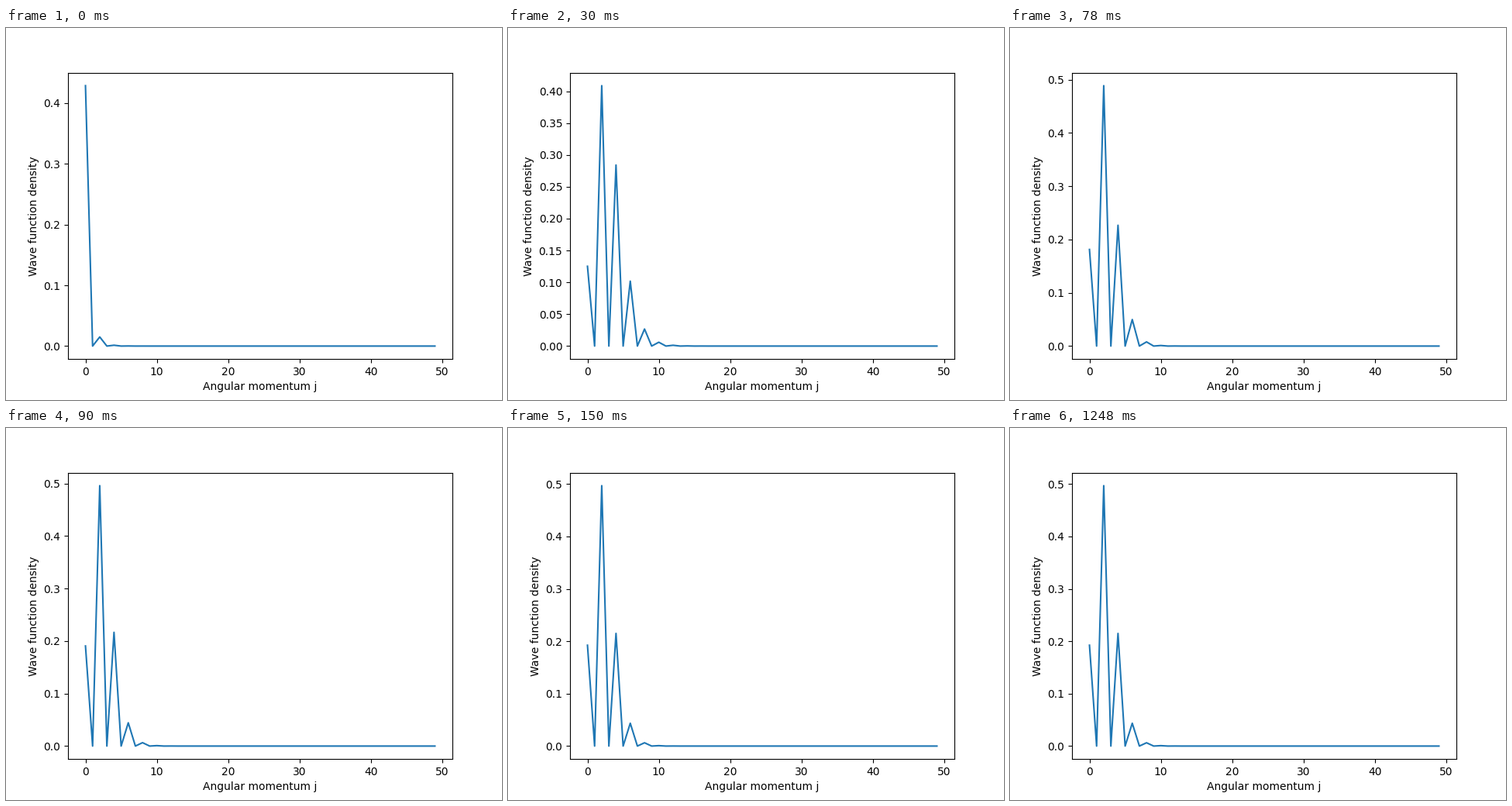
Animation of 640x480 px, one loop 1.96 s. Source, as a matplotlib script:

```python
import numpy as np
import matplotlib.pyplot as plt
from matplotlib.animation import FuncAnimation

LOOP_MS = 1960
TICK_MS = 10      # animation interval
STEP_MS = 30      # time between iterations
LAST_STEP = 6
LEVELS = 50

# Shape of a state: ground density, first ratio, tail ratio, falloff power
START = np.array([0.4287, 0.035, 0.2, 0.6])
EXCITED = np.array([0.1252, 3.264, 0.175, 2.57])
SETTLED = np.array([0.1925, 2.582, 0.1, 2.9])
DECAY = np.array([1 / 6, 1 / 6, 1 / 9, 1 / 9])   # error left after each step


def shape(step):
    """The first step excites the start state, later ones converge."""
    if step == 0:
        return START
    return SETTLED + (EXCITED - SETTLED) * DECAY ** (step - 1)


def density(step):
    """Density over all levels; only even levels are occupied."""
    ground, first, tail, power = shape(step)
    n = np.arange(1, LEVELS // 2)
    ratios = tail + (first - tail) / n ** power
    full = np.zeros(LEVELS)
    full[::2] = ground * np.cumprod(np.append(1, ratios))
    return full


fig, ax = plt.subplots(figsize=(6.4, 4.8), dpi=100)
line, = ax.plot(np.arange(LEVELS), density(0))
ax.set_xlabel("Angular momentum j")
ax.set_ylabel("Wave function density")


def update(frame):
    step = min(frame * TICK_MS // STEP_MS, LAST_STEP)
    line.set_ydata(density(step))
    ax.relim()
    ax.autoscale_view()
    return line,


anim = FuncAnimation(fig, update, frames=LOOP_MS // TICK_MS,
                     init_func=lambda: update(0), interval=TICK_MS,
                     repeat=True, repeat_delay=0, blit=False)
plt.show()
```
